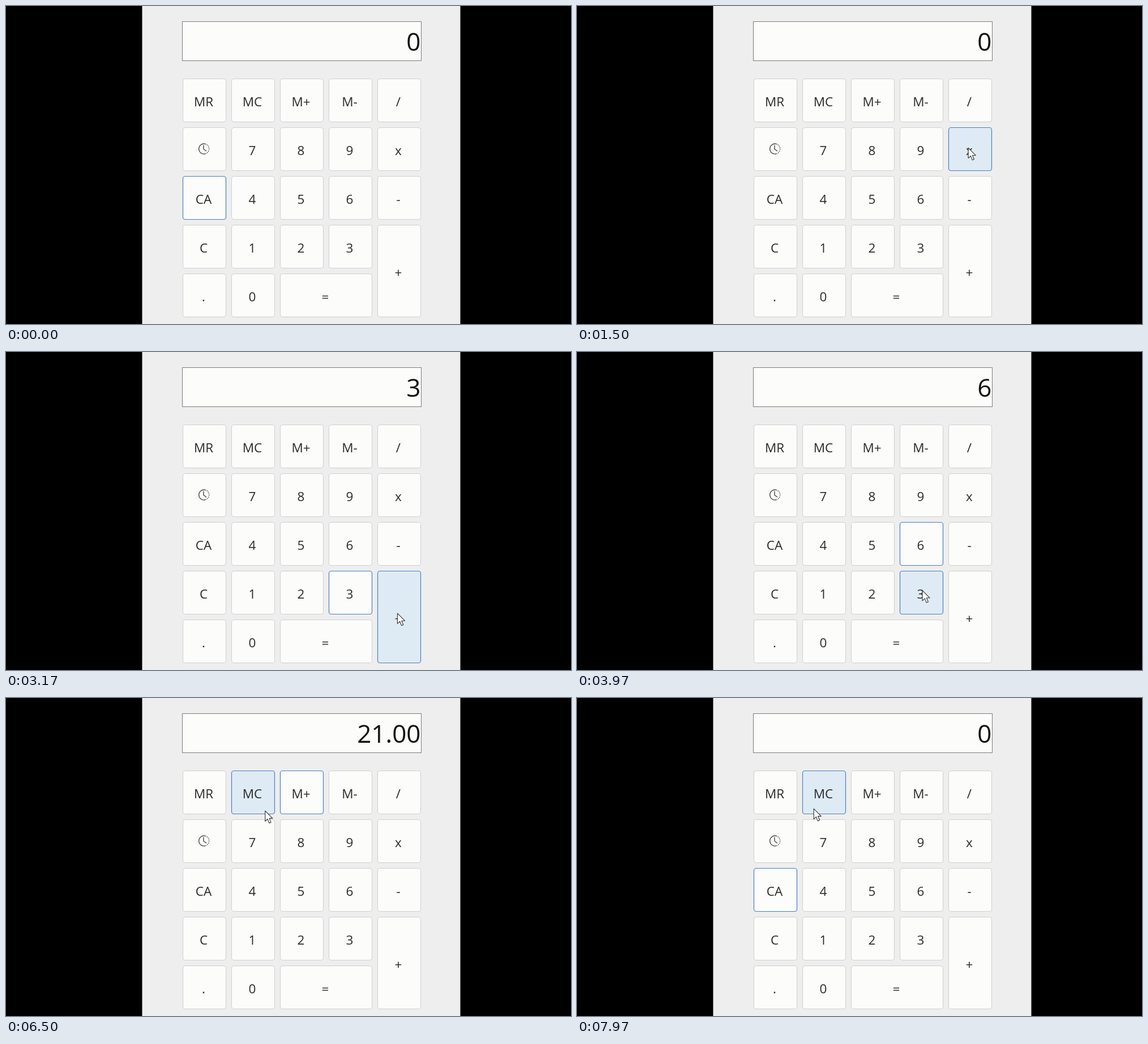
Write an HTML page that moves like this. It is 998 px wide and 561 px high and loops after 8 s.

```html
<!DOCTYPE html>
<html lang="en">
<head>
<meta charset="utf-8">
<title>Calculator</title>
<style>
html, body { margin: 0; width: 100%; height: 100%; overflow: hidden; background: #000; }
svg { display: block; width: 100vw; height: 100vh; }
text { font-family: "Open Sans", "Noto Sans", sans-serif; font-size: 22.5px; fill: #2a2a2a; text-anchor: middle; }
#value { font-size: 44px; fill: #111; text-anchor: end; }
.key rect { fill: #fcfcfb; stroke: #cfcfd0; }
.key.focus rect, .key.hover rect { stroke: #4a7fc0; stroke-width: 1.2; }
.key.hover rect { fill: #deebf5; }
.icon { fill: none; stroke: #444; stroke-width: 1.4; }
</style>
</head>
<body>
<svg viewBox="0 0 998 561">
  <clipPath id="panel"><rect x="240.5" width="562" height="561"/></clipPath>
  <rect width="998" height="561"/>
  <rect x="240.5" width="562" height="561" fill="#eee"/>
  <rect x="311.5" y="27.5" width="422" height="69" fill="#fcfcfb" stroke="#7c7c7c"/>
  <text id="value" x="732.5" y="79">0</text>
  <g id="keys"></g>
  <g class="icon">
    <path d="M352 243.4A9 9 0 1 0 352 260.8M349 245.5V252.5L354 256"/>
    <path d="M352 243.4A9 9 0 0 1 352 260.8" stroke-dasharray="1.5 1.5"/>
  </g>
  <g clip-path="url(#panel)">
    <path id="cursor" d="M0 0V18.2L4.2 14.3L7.2 21.5L10.3 20.2L7.3 13.2H13Z"
      fill="#fff" stroke="#333" stroke-width="1.1" stroke-linejoin="round"/>
  </g>
</svg>
<script>
const LOOP = 8000, PITCH = 86.1, SIZE = 76;
const HOLD = 40, TRAVEL = 0.6; // ms at rest after a click; share of the gap spent moving
const $ = id => document.getElementById(id);

function add(parent, tag, attrs) {
  const el = document.createElementNS('http://www.w3.org/2000/svg', tag);
  for (const k in attrs) el.setAttribute(k, attrs[k]);
  return parent.appendChild(el);
}

const keys = {};
function addKey(label, col, row, cols = 1, rows = 1) {
  const x = Math.round(312 + col * PITCH) + 0.5, y = Math.round(128 + row * PITCH) + 0.5;
  const w = Math.round(SIZE + (cols - 1) * PITCH), h = Math.round(SIZE + (rows - 1) * PITCH);
  const el = add($('keys'), 'g', { class: 'key' });
  add(el, 'rect', { x, y, width: w, height: h, rx: 4 });
  if (label !== 'clock')
    add(el, 'text', { x: x + w / 2 - 1.5, y: y + h / 2 + 10 }).textContent = label;
  keys[label] = { x, y, w, h, el };
}
['MR MC M+ M- /', 'clock 7 8 9 x', 'CA 4 5 6 -', 'C 1 2 3', '. 0'].forEach((line, row) =>
  line.split(' ').forEach((label, col) => addKey(label, col, row)));
addKey('+', 4, 3, 1, 2);
addKey('=', 2, 4, 2, 1);

// A visit to a key; fx and fy place the pointer within it. No display value means no click.
function visit(time, key, shown, fx = 0.46, fy = 0.46) {
  const k = keys[key];
  return { time, key, shown, x: k.x + k.w * fx, y: k.y + k.h * fy };
}

const visits = [
  visit(0, 'CA', '0'),
  { time: 130, x: 470, y: 565 },
  visit(820, '5', '5'),
  visit(1460, 'x', '0'),
  visit(2490, '3', '3', 0.73, 0.36),
  visit(3200, '+', '0'),
  visit(3757, '6', '6', 0.75, 0.5),
  visit(4972, '=', '21.00', 0.69, 0.17),
  visit(5980, 'M+', '21.00', 0.65, 0.5),
  visit(6480, 'MC', undefined, 0.78, 0.93),
  visit(7060, 'CA', '0'),
  visit(7330, 'CA'),
  visit(7970, 'MC', undefined, 0.26, 0.88)
];

function pointer(t) {
  const [, entry] = visits;
  if (t < entry.time) return entry;
  const i = visits.findLastIndex(v => v.time <= t);
  const a = visits[i], b = visits[i + 1] || a;
  const u = (t - a.time - HOLD) / (TRAVEL * (b.time - a.time) || 1);
  const e = 1 - (1 - Math.min(1, Math.max(0, u))) ** 3;
  return { x: a.x + (b.x - a.x) * e, y: a.y + (b.y - a.y) * e };
}

function draw(now) {
  const t = now % LOOP;
  const { x, y } = pointer(t);
  const click = visits.findLast(v => v.shown && v.time <= t);
  $('value').textContent = click.shown;
  $('cursor').setAttribute('transform', `translate(${x} ${y})`);
  for (const label in keys) {
    const k = keys[label];
    k.el.classList.toggle('focus', label === click.key);
    k.el.classList.toggle('hover', x >= k.x && x <= k.x + k.w && y >= k.y && y <= k.y + k.h);
  }
  requestAnimationFrame(draw);
}
requestAnimationFrame(draw);
</script>
</body>
</html>
```
